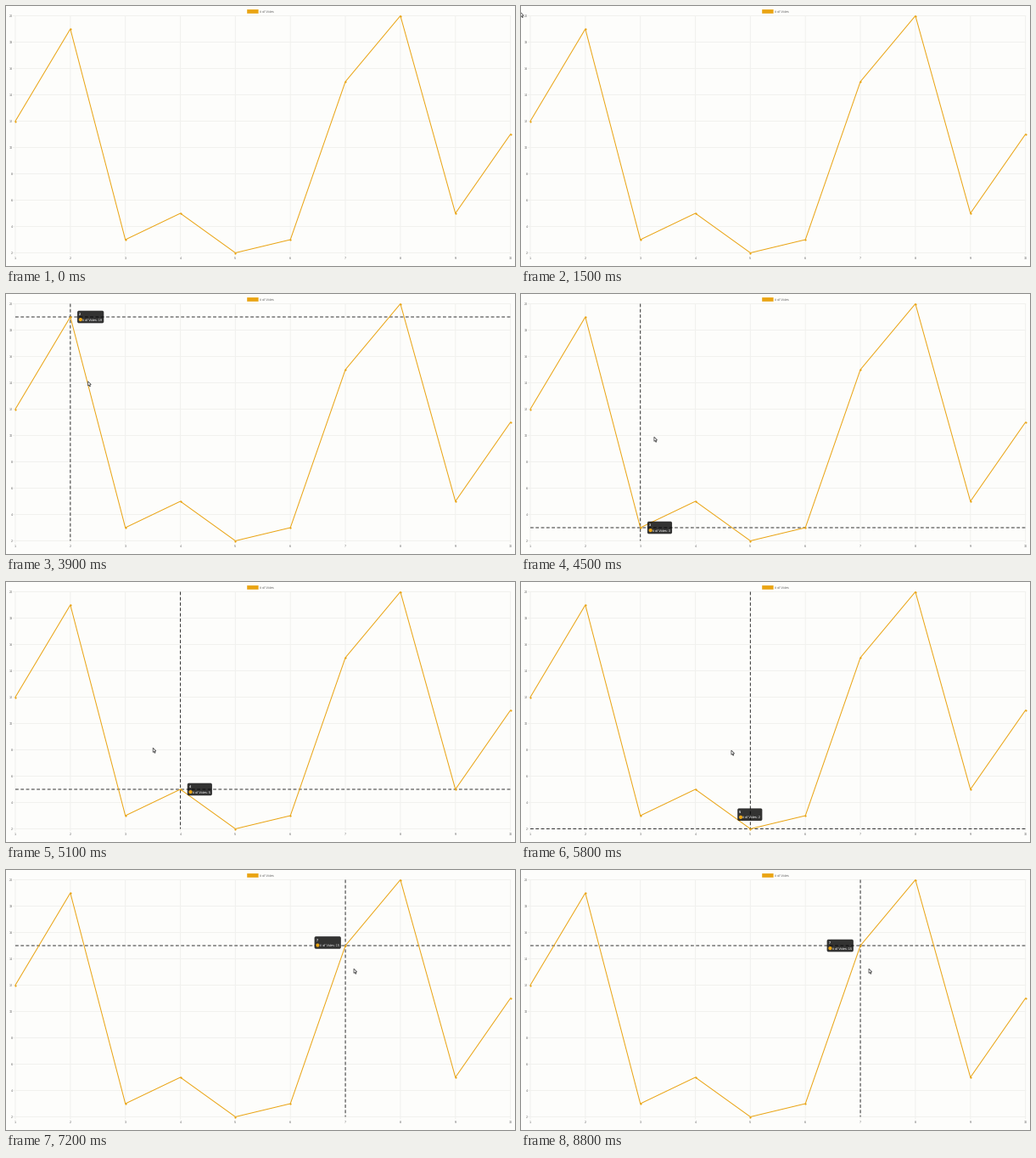
These frames come from a looping animation (600 by 306 pixels, 8.9 s). A matplotlib script:

```python
import numpy as np
import matplotlib.pyplot as plt
from matplotlib.animation import FuncAnimation
from matplotlib.patches import Circle, FancyBboxPatch, Polygon, Rectangle

W, H, DPI = 600, 306, 100
FRAMES, STEP = 89, 100
PX = 72 / DPI                      # points per pixel
LEFT, RIGHT, TOP, BOTTOM = 11, 594.6, 11.5, 290.5
AMBER, GRID, INK, PAPER = "#eaa412", "#f1f1ee", "#666666", "#fdfdfb"
VOTES = [12, 19, 3, 5, 2, 3, 15, 20, 5, 11]
FONT_PX = 3.75
GAP, TIP_H = 8.2, 14.6             # tooltip distance from its point, height
MOVE_MS, FADE_MS, TICK = 400, 200, 5

plt.rcParams.update({
    "font.family": "Liberation Sans",
    "text.hinting": "none",
    "path.snap": False,
})


def y_of(votes):
    return BOTTOM - (np.asarray(votes) - 2) * (BOTTOM - TOP) / 18


xs = np.linspace(LEFT, RIGHT, len(VOTES))
ys = y_of(VOTES)

# Turning points of the pointer: time in ms, x, y
TURNS = [
    (800, -9, 12), (1200, -0.5, 7.5), (1800, -0.5, 7.5), (2900, 15, 20),
    (3000, 53.2, 36.5), (3900, 96.6, 102.8), (4700, 177, 190),
    (5100, 173.2, 195.2), (6260, 297, 200), (6320, 440, 125),
    (6500, 441, 114.2), (6900, 441, 112), (7200, 410, 116.2),
]


def pointer(t):
    when, x, y = zip(*TURNS)
    return np.interp(t, when, x), np.interp(t, when, y)


def tip_box(i):
    """Resting left, top and width of the tooltip for point i."""
    width = 27.1 + 2.08 * len(str(VOTES[i]))
    on_right = xs[i] <= (LEFT + RIGHT) / 2
    left = xs[i] + GAP if on_right else xs[i] - GAP - width
    return np.array([left, ys[i] - TIP_H / 2, width])


def ease_out_quart(p):
    return 1 - (1 - min(p, 1)) ** 4


def simulate():
    """Hovered index, tooltip box and opacity for each displayed moment."""
    states, active, shown_at, moved_at = [], None, 0, 0
    start = box = None
    for t in range(0, FRAMES * STEP, TICK):
        x, y = pointer(t)
        if x >= LEFT and y >= TOP:
            near = int(np.argmin(abs(xs - x)))
            if active is None:
                active, shown_at, moved_at = near, t, t
                start = tip_box(near)
            elif near != active:
                active, moved_at, start = near, t, box
        if active is not None:
            p = ease_out_quart((t - moved_at) / MOVE_MS)
            box = start + (tip_box(active) - start) * p
        if t % STEP == 0:
            states.append((active, box, min((t - shown_at) / FADE_MS, 1)))
    return states


STATES = simulate()

fig = plt.figure(figsize=(W / DPI, H / DPI), dpi=DPI, facecolor=PAPER)
ax = fig.add_axes([0, 0, 1, 1])
ax.set_xlim(0, W)
ax.set_ylim(H, 0)
ax.axis("off")


def label(x, y, s, color=INK, **kw):
    return ax.text(x, y, s, color=color, fontsize=FONT_PX * PX,
                   va="center_baseline", **kw)


def stroke(x, y, color, width=1, **kw):
    return ax.plot(x, y, color=color, lw=width * PX, **kw)[0]


# Grid, ticks and legend
for i, x in enumerate(xs):
    stroke([x, x], [TOP, BOTTOM + 2.5], GRID, zorder=1)
    label(x, 296.2, str(i + 1), ha="center")
for v in range(2, 21, 2):
    y = y_of(v)
    stroke([LEFT - 2.5, RIGHT], [y, y], GRID, zorder=1)
    label(7.6, y, str(v), ha="right")
ax.add_patch(Rectangle((284.2, 4.1), 13.4, 4.7, color=AMBER, lw=0))
label(299, 6.4, "# of Votes")

# Crosshair and data line
vline, hline = (stroke([], [], "#333333", ls=(0, (3.8, 2.5)),
                       dash_capstyle="butt", zorder=2) for _ in range(2))
stroke(xs, ys, AMBER, zorder=3, marker="o", ms=2.2 * PX, mew=0,
       solid_joinstyle="round")

# Tooltip
panel = FancyBboxPatch((0, 0), 1, 1, boxstyle="round,pad=0,rounding_size=1.9",
                       fc="black", lw=0, zorder=5)
dot = Circle((0, 0), 2.1, fc=AMBER, lw=0, zorder=6)
ax.add_patch(panel)
ax.add_patch(dot)
title = label(0, 0, "", "white", weight="bold", zorder=6)
body = label(0, 0, "", "white", zorder=6)
hover_parts = [vline, hline, panel, dot, title, body]

# Pointer
ARROW = 0.9 * np.array([(0, 0), (0, 5.8), (1.3, 4.7), (2.3, 6.8), (3.2, 6.4),
                        (2.3, 4.4), (4.1, 4.2)])
arrow = Polygon(ARROW, closed=True, fc="#f8f8f8", ec="#444444", lw=0.75 * PX, zorder=8)
ax.add_patch(arrow)


def draw(n):
    arrow.set_xy(ARROW + pointer(n * STEP))
    active, box, alpha = STATES[n]
    for part in hover_parts:
        part.set_visible(active is not None)
    if active is not None:
        left, top, width = box
        vline.set_data([xs[active]] * 2, [TOP, BOTTOM])
        hline.set_data([LEFT, RIGHT], [ys[active]] * 2)
        panel.set_bounds(left, top, width, TIP_H)
        panel.set_alpha(0.8 * alpha)
        dot.center = left + 3.8, top + 10.4
        title.set_position((left + 1.9, top + 4.1))
        title.set_text(str(active + 1))
        body.set_position((left + 6.3, top + 10.4))
        body.set_text(f"# of Votes: {VOTES[active]}")
        for part in (dot, title, body):
            part.set_alpha(alpha)
    return hover_parts + [arrow]


anim = FuncAnimation(fig, draw, frames=FRAMES, interval=STEP, repeat=True,
                     repeat_delay=0, init_func=lambda: draw(0))
plt.show()
```
